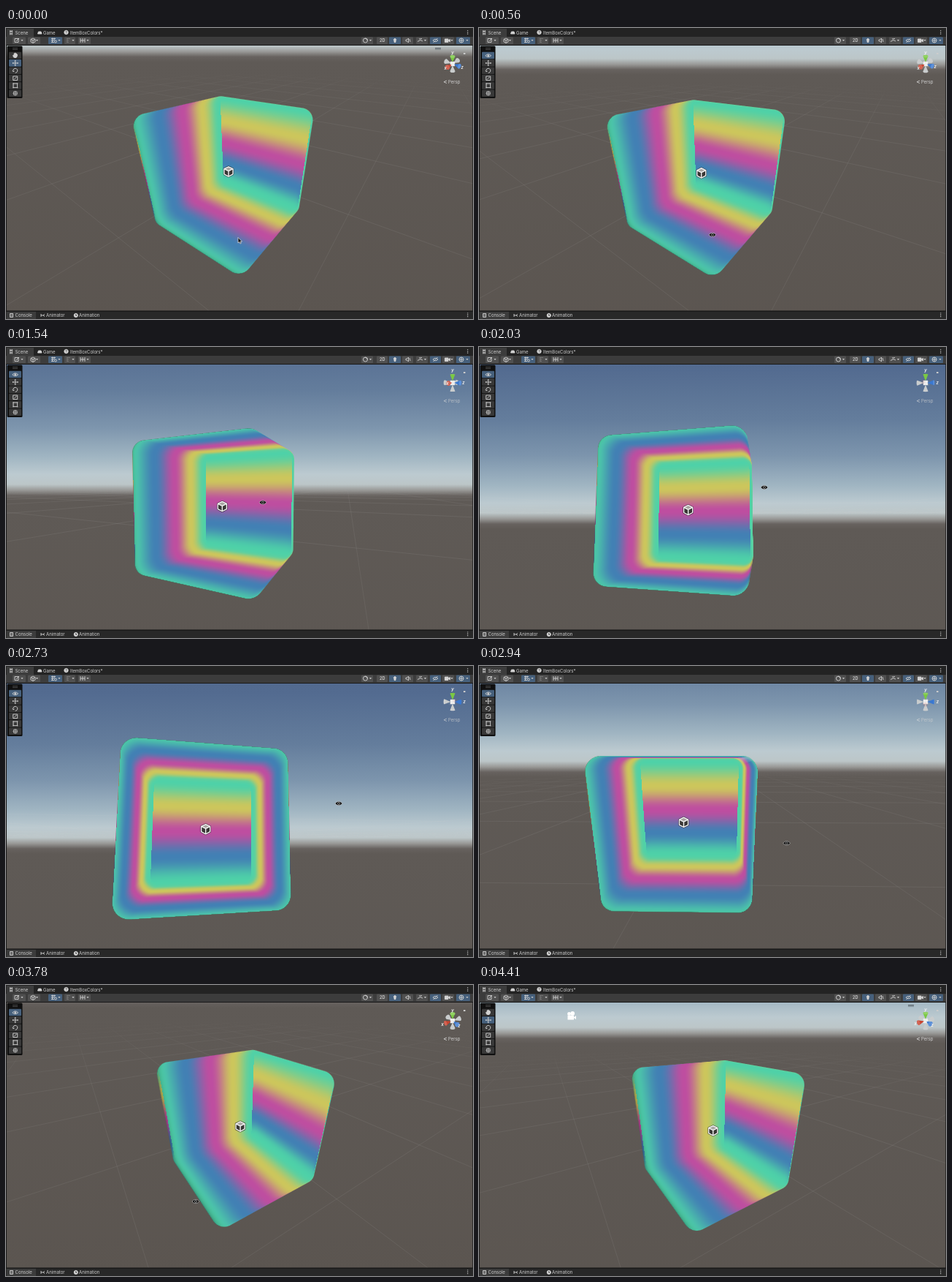
An HTML page with a canvas for the animation above (4.55 s loop, 640x398 px).

```html
<!DOCTYPE html>
<html lang="en">
<head>
<meta charset="utf-8">
<title>Scene orbit</title>
<style>
html, body { margin: 0; width: 640px; height: 398px; overflow: hidden; background: #1f1f1f; }
canvas, svg { position: absolute; left: 0; top: 0; width: 640px; height: 398px; display: block; }
text { font: 6px Inter, Roboto, sans-serif; fill: #d0d0d0; }
.btn { fill: #505050; }
.on { fill: #46607c; }
.ico { fill: none; stroke: #d2d2d2; stroke-width: .9; }
.solid { fill: #d2d2d2; }
</style>
</head>
<body>
<canvas id="view" width="640" height="398"></canvas>
<svg viewBox="0 0 640 398">
  <!-- tabs and toolbar -->
  <path fill="#232323" d="M0 0H640V12H0Z"/>
  <path fill="#3c3c3c" d="M1 1H38V12H640V23.500H0V12H1Z"/>
  <path fill="#191919" d="M0 23H640V24H0Z"/>
  <g class="ico">
    <path d="M5 4.500H9M5 8H9M5.800 3V9.500M8.200 3V9.500"/>
    <path d="M43.500 8L44.500 5H48L49 8Z" class="solid"/>
    <circle cx="82.500" cy="6" r="2.700" class="solid"/>
  </g>
  <text x="81.200" y="8" style="fill:#222;font-size:5px">?</text>
  <text x="12.500" y="8.700">Scene</text>
  <text x="51" y="8.700">Game</text>
  <text x="88" y="8.700">ItemBoxColors*</text>
  <g id="bar"></g>
  <g class="ico">
    <path d="M12 19.500V14.500H17V19.500ZM14 18L18 14"/>
    <path d="M34 15.500L37 14L40 15.500V19L37 20.500L34 19ZM34 15.500L37 17L40 15.500M37 17V20.500"/>
    <path d="M62 14.500H68M62 17H66M62 19.500H66M63.500 13.500V20M66 13.500V17"/>
    <circle cx="68" cy="18.500" r="1.500"/>
    <path d="M83 14.500H88M83 17H86M83 19.500H86M84 14V20" stroke="#777"/>
    <path d="M102 14V20M105 14V20M108 14V20M102 17H108"/>
    <circle cx="492.500" cy="17" r="3"/>
    <path d="M492 14.500A2.500 2.500 0 0 1 495 17"/>
    <path class="solid" d="M532 19.500V18L531.300 15.500A2 2 0 0 1 534.700 15.500L534 18V19.500Z"/>
    <path d="M548 16H549.500L551.500 14V20L549.500 18H548ZM553 15L554 19"/>
    <path d="M564 18.500L568 16.500L571 18M566 15L570 14.500"/>
    <path d="M585 17Q588.500 13.500 592 17Q588.500 20.500 585 17M585.500 20L591.500 14"/>
    <path class="solid" d="M601.500 15H606V19.500H601.500ZM606 17L608.500 15.500V19Z"/>
    <circle cx="624" cy="17" r="3"/>
    <path d="M621 17H627M624 14V20"/>
  </g>
  <text x="512" y="19.200" style="font-size:5.500px;font-weight:600">2D</text>
  <g id="carets" fill="#c8c8c8"></g>
  <!-- floating tools -->
  <rect x="1.500" y="24.500" width="21" height="71.500" rx="1.500" fill="#101010"/>
  <path d="M9 27.500H16M9 29.500H16" stroke="#555" stroke-width=".8"/>
  <g id="tools"></g>
  <g class="ico">
    <g id="hand"><path class="solid" d="M10.500 40L9.500 37.500L11 37.500V35H12V34.300H13V35H14.500V36H15.300V38.500L14 40.500H11.500Z"/></g>
    <g id="eye"><path d="M8.800 37.800Q12.700 33.800 16.600 37.800Q12.700 41.500 8.800 37.800"/><circle cx="12.700" cy="37.800" r="1" class="solid"/></g>
    <path d="M9 48H16.500M12.700 44.300V51.700M10 47L9 48L10 49M15.500 47L16.500 48L15.500 49M11.700 45.300L12.700 44.300L13.700 45.300M11.700 50.700L12.700 51.700L13.700 50.700"/>
    <path d="M10 59.500A3 3 0 1 1 12.700 61.300M9 58.500L10 59.800L11.500 59"/>
    <path d="M9.700 71.500V66H15.700V71.500ZM11 70.500L14.500 67"/>
    <path d="M10 76H15.500V81.500H10ZM9 76H16.500M9 81.500H16.500M10 75V82.500M15.500 75V82.500" stroke-width=".6"/>
    <path d="M9.300 89.300H16M12.700 86V92.700M10.500 87H15V91.500H10.500Z" stroke-width=".7"/>
  </g>
  <path id="grip" d="M588 27.500H596M588 29H596" stroke="#59636a" stroke-width=".9"/>
  <path d="M627 34H629.500V36H627Z" fill="#ccc"/>
  <g id="persp">
    <path d="M604 72L600 73.700L604 75.500" fill="none" stroke="#ddd" stroke-width=".8"/>
    <text x="606" y="75.800">Persp</text>
  </g>
  <!-- lower tabs -->
  <path fill="#191919" d="M0 386.500H640V398H0ZM0 24H1V387H0ZM639.300 24H640V387H639.300Z"/>
  <path fill="#282828" d="M0 388H640V398H0Z"/>
  <path fill="#3c3c3c" d="M1 388H41V398H1Z"/>
  <g class="ico">
    <path d="M5.500 390.500H9.500V395.500H5.500ZM6.500 392H8.500M6.500 394H8.500"/>
    <path d="M48 391V395M48 393H51L53 391.500M51 393L53 394.500"/>
    <circle cx="95.800" cy="393" r="2.600" class="solid"/>
    <path d="M95.800 391.500V393.200H97" stroke="#222"/>
  </g>
  <text x="12.500" y="395.200">Console</text>
  <text x="55" y="395.200">Animator</text>
  <text x="100" y="395.200">Animation</text>
  <path stroke="#ccc" stroke-width="1.100" stroke-dasharray="1.100 1.200" d="M632.700 3V9M632.700 389.500V395.500"/>
  <!-- cursors -->
  <path id="arrow" d="M0 0V7.500L1.800 6L3 8.500L4.300 7.900L3.200 5.500H5.500Z" fill="#111" stroke="#eee" stroke-width=".7"/>
  <g id="look">
    <path d="M-5 0Q0 -5.400 5 0Q0 5.400 -5 0Z" fill="#0a0a0a" stroke="#ddd" stroke-width=".5"/>
    <circle r="1.500" fill="none" stroke="#bbb" stroke-width=".7"/>
  </g>
</svg>
<script>
const LOOP = 4550, STEP = 70, START = 350, END = 4200;
const CX = 320, CY = 205.5, FOCAL = 314, TOP = 24, BOTTOM = 387;
const DIST = 1.72, OFFSET = [-.243, -.091, .167];   // box centre relative to the orbit pivot
const HALF = .52, ROUND = .1;
// pointer drag: time, x, y
const DRAG = [[350, 319, 290], [1050, 327, 245], [2030, 391, 192], [2730, 456, 188],
              [3220, 345, 326], [3780, 260, 296], [4130, 261, 276]];
const BANDS = [[78, 209, 168], [66, 128, 180], [190, 78, 160], [204, 198, 92]];
// sky: pixels below the horizon, colour
const SKY = [[-260, '#4f668b'], [-200, '#536b90'], [-130, '#647d9c'], [-80, '#7d95ad'], [-40, '#a0b5c2'],
             [-16, '#bccad0'], [-2, '#bcc6c8'], [6, '#989896'], [13, '#67625f'], [20, '#5f5a56'], [400, '#5b5550']];

const $ = id => document.getElementById(id);
const ctx = $('view').getContext('2d', { willReadFrequently: true });
const dot = (a, b) => a[0] * b[0] + a[1] * b[1] + a[2] * b[2];
const clamp = (v, lo, hi) => Math.min(hi, Math.max(lo, v));
const rad = deg => deg * Math.PI / 180;

const slope = (i, c) => (DRAG[i + 1][c] - DRAG[i][c]) / (DRAG[i + 1][0] - DRAG[i][0]);
function tangent(i, c) {
  if (i === 0 || i === DRAG.length - 1) return 0;
  const a = slope(i - 1, c), b = slope(i, c);
  return a * b > 0 ? 2 * a * b / (a + b) : 0;
}
function pointer(t, c) {
  t = clamp(t, DRAG[0][0], DRAG[DRAG.length - 1][0]);
  let i = 0;
  while (i < DRAG.length - 2 && t > DRAG[i + 1][0]) i++;
  const w = DRAG[i + 1][0] - DRAG[i][0], s = (t - DRAG[i][0]) / w, r = 1 - s;
  return DRAG[i][c] * (1 + 2 * s) * r * r + DRAG[i + 1][c] * s * s * (3 - 2 * s)
       + w * s * r * (tangent(i, c) * r - tangent(i + 1, c) * s);
}

function camera(x, y) {
  const yaw = rad(-36.5 + .345 * (x - 319)), pitch = rad(29.7 + .347 * (y - 290));
  const s = Math.sin(yaw), c = Math.cos(yaw), sp = Math.sin(pitch), cp = Math.cos(pitch);
  const right = [c, 0, -s], up = [s * sp, cp, c * sp], fwd = [s * cp, -sp, c * cp];
  const eye = OFFSET.map((o, i) => -o - DIST * fwd[i]);
  return { right, up, fwd, eye, horizon: CY - FOCAL * Math.tan(pitch) };
}
function toScreen(cam, v) {
  const z = dot(v, cam.fwd);
  return [CX + FOCAL * dot(v, cam.right) / z, CY - FOCAL * dot(v, cam.up) / z, z];
}
const project = (cam, p) => toScreen(cam, p.map((v, i) => v - cam.eye[i]));

const last = camera(261, 276);
const REEL_DIR = [0, 1, 2].map(i => -194 * last.right[i] + 163.5 * last.up[i] + FOCAL * last.fwd[i]);

function drawSky(h) {
  const g = ctx.createLinearGradient(0, h - 260, 0, h + 400);
  for (const [y, col] of SKY) g.addColorStop((y + 260) / 660, col);
  ctx.fillStyle = g;
  ctx.fillRect(0, TOP, 640, BOTTOM - TOP);
}

function drawGrid(cam) {
  const N = 9;
  ctx.lineWidth = .8;
  const piece = (a, b) => {
    const p = project(cam, a), q = project(cam, b);
    if (p[2] < .1 || q[2] < .1) return;
    const fade = 1 - Math.hypot(a[0], a[2]) / N;
    if (fade <= 0) return;
    ctx.strokeStyle = `rgba(205,205,205,${.13 * fade})`;
    ctx.beginPath();
    ctx.moveTo(p[0], p[1]);
    ctx.lineTo(q[0], q[1]);
    ctx.stroke();
  };
  for (let k = -N; k <= N; k++)
    for (let j = -N; j < N; j += .5) {
      piece([k, 0, j], [k, 0, j + .5]);
      piece([j, 0, k], [j + .5, 0, k]);
    }
}

// Far side of a rounded box: walk each ray back from where it leaves the box.
function drawBox(cam) {
  const pts = [];
  for (let i = 0; i < 8; i++)
    pts.push(project(cam, [i & 1 ? HALF : -HALF, i & 2 ? HALF : -HALF, i & 4 ? HALF : -HALF]));
  const xs = pts.map(p => p[0]), ys = pts.map(p => p[1]);
  const x0 = Math.max(0, Math.floor(Math.min(...xs))), x1 = Math.min(640, Math.ceil(Math.max(...xs)));
  const y0 = Math.max(TOP, Math.floor(Math.min(...ys))), y1 = Math.min(BOTTOM, Math.ceil(Math.max(...ys)));
  const img = ctx.getImageData(x0, y0, x1 - x0, y1 - y0), px = img.data;
  const { right: R, up: U, fwd: F, eye: E } = cam, core = HALF - ROUND;
  const d = [0, 0, 0];
  let k = -4;
  for (let y = y0; y < y1; y++) for (let x = x0; x < x1; x++) {
    k += 4;
    const a = x + .5 - CX, b = CY - y - .5, len = Math.hypot(a, b, FOCAL);
    let near = 0, far = 1e9;
    for (let i = 0; i < 3; i++) {
      d[i] = (F[i] * FOCAL + R[i] * a + U[i] * b) / len;
      const mid = -E[i] / d[i], ext = Math.abs(HALF / d[i]);
      near = Math.max(near, mid - ext);
      far = Math.min(far, mid + ext);
    }
    if (near >= far) continue;
    let t = far, best = 1, qx, qy, qz, py, pz;
    for (let n = 0; n < 30 && t > near - .01; n++) {
      py = E[1] + d[1] * t;
      pz = E[2] + d[2] * t;
      qx = Math.abs(E[0] + d[0] * t) - core;
      qy = Math.abs(py) - core;
      qz = Math.abs(pz) - core;
      const gap = Math.hypot(Math.max(qx, 0), Math.max(qy, 0), Math.max(qz, 0)) - ROUND;
      best = Math.min(best, gap);
      if (gap < .0008) break;
      t -= gap;
    }
    const cover = best < .0008 ? 1 : clamp(1 - best * FOCAL / far, 0, 1);
    if (!cover) continue;
    const u = clamp((qz >= Math.max(qx, qy) ? py : pz) + .5, 0, .9999) * 4, i = Math.floor(u);
    const s = u - i, e = s * s * (3 - 2 * s);
    // the front rim turns darker as it curves over
    const rim = pz < 0 ? clamp(qz / ROUND, 0, 1) : 0, shade = 1 - .3 * rim * rim;
    const A = BANDS[i], B = BANDS[(i + 1) % 4];
    for (let c = 0; c < 3; c++)
      px[k + c] += ((A[c] + (B[c] - A[c]) * e) * shade - px[k + c]) * cover;
  }
  ctx.putImageData(img, x0, y0);
}

function poly(points, fill, stroke, width = 1) {
  ctx.beginPath();
  points.forEach(([x, y]) => ctx.lineTo(x, y));
  ctx.closePath();
  if (fill) { ctx.fillStyle = fill; ctx.fill(); }
  if (stroke) { ctx.strokeStyle = stroke; ctx.lineWidth = width; ctx.stroke(); }
}

function drawIcon(cam) {
  const [x, y] = project(cam, [0, 0, 0]);
  ctx.save();
  ctx.translate(x, y);
  ctx.lineJoin = 'round';
  const hex = [[0, -6.5], [6, -3.6], [6, 3.6], [0, 6.8], [-6, 3.6], [-6, -3.6]];
  poly(hex, '#3a3836', 'rgba(25,25,25,.7)', 2.6);
  poly([[0, -6.5], [6, -3.6], [0, -.6], [-6, -3.6]], '#a9a5a2');
  poly(hex, null, '#f4f4f4', 1.4);
  ctx.beginPath();
  ctx.moveTo(-6, -3.6); ctx.lineTo(0, -.6); ctx.lineTo(6, -3.6);
  ctx.moveTo(0, -.6); ctx.lineTo(0, 6.8);
  ctx.stroke();
  ctx.restore();
}

function disc(x, y, r) {
  ctx.beginPath();
  ctx.arc(x, y, r, 0, 7);
  ctx.fill();
}

function drawReel(cam) {
  const [x, y, z] = toScreen(cam, REEL_DIR);
  if (z <= 0) return;
  ctx.fillStyle = '#fff';
  disc(x - 2.5, y - 2.6, 2.4);
  disc(x + 2.2, y - 3.2, 2.9);
  ctx.fillRect(x - 4.5, y - .5, 8.5, 6);
  poly([[x + 3.5, y + 2.5], [x + 7, y], [x + 7, y + 5]], '#fff');
}

function drawGizmo(cam) {
  const gx = 612, gy = 49, reach = 11.5, wide = 3.5;
  const axes = [['x', [0, 0, -1], '#c9432f'], ['y', [0, 1, 0], '#7ac943'], ['z', [1, 0, 0], '#3a78d0']];
  const arms = [{ v: [0, 0, 0], hub: true }];
  for (const [name, v, col] of axes) {
    arms.push({ v, col, name });
    arms.push({ v: v.map(n => -n), col: '#c9cccd' });
  }
  arms.sort((a, b) => dot(b.v, cam.fwd) - dot(a.v, cam.fwd));
  ctx.font = 'italic 600 6px Inter, Roboto, sans-serif';
  ctx.textAlign = 'center';
  ctx.textBaseline = 'middle';
  for (const { v, col, name, hub } of arms) {
    if (hub) {
      ctx.fillStyle = '#eee';
      ctx.fillRect(gx - 3.2, gy - 3.2, 6.4, 6.4);
      continue;
    }
    const dx = dot(v, cam.right), dy = -dot(v, cam.up), z = dot(v, cam.fwd), len = Math.hypot(dx, dy);
    ctx.globalAlpha = clamp((.985 - Math.abs(z)) * 12, 0, 1);
    ctx.save();
    ctx.translate(gx, gy);
    ctx.rotate(Math.atan2(dy, dx));
    ctx.fillStyle = col;
    ctx.beginPath();
    ctx.moveTo(2.5 * len, 0);
    ctx.lineTo(reach * len, -wide);
    ctx.ellipse(reach * len, 0, Math.abs(z) * wide + .4, wide, 0, -Math.PI / 2, Math.PI / 2);
    ctx.fill();
    if (z < 0) {
      ctx.fillStyle = 'rgba(255,255,255,.18)';
      ctx.beginPath();
      ctx.ellipse(reach * len, 0, Math.abs(z) * wide + .2, wide, 0, 0, 7);
      ctx.fill();
    }
    ctx.restore();
    if (name) {
      ctx.fillStyle = '#f2f2f2';
      ctx.fillText(name, gx + dx * 16.5, gy + dy * 16.5);
    }
  }
  ctx.globalAlpha = 1;
}

function buildUi() {
  const rect = (x, y, w, h, cls) => `<rect class="${cls}" x="${x}" y="${y}" width="${w}" height="${h}" rx="1"/>`;
  const bar = [[9, 18], [30, 17], [58, 19, 1], [80, 15], [99, 17], [487, 16], [508, 15], [525, 16, 1],
               [543, 15], [562, 16], [581, 15, 1], [598, 16], [617, 19, 1]];
  $('bar').innerHTML = bar.map(([x, w, on]) => rect(x, 12.5, w, 9.5, on ? 'on' : 'btn')).join('');
  $('carets').innerHTML = [22, 42.5, 73, 92, 112, 499.5, 574.5, 611, 632]
    .map(x => `<path d="M${x - 1.6} 16H${x + 1.6}L${x} 18Z"/>`).join('');
  $('tools').innerHTML = [0, 1, 2, 3, 4, 5].map(i => rect(4, 32.7 + i * 10.35, 17, 9.6, 'btn')).join('');
}

function show(id, on) { $(id).style.display = on ? '' : 'none'; }

function render(t) {
  const x = pointer(t, 1), y = pointer(t, 2), cam = camera(x, y);
  drawSky(cam.horizon);
  drawGrid(cam);
  drawBox(cam);
  drawReel(cam);
  drawIcon(cam);
  drawGizmo(cam);

  const orbiting = t >= START && t < END;
  show('look', orbiting);
  show('eye', orbiting);
  show('hand', !orbiting);
  show('grip', !orbiting);
  show('arrow', t < START || t === END);
  [...$('tools').children].forEach((el, i) =>
    el.style.fill = i === (orbiting ? 0 : 1) ? '#46607c' : '#383838');
  $('persp').style.opacity = cam.horizon > 90 ? .75 : 1;
  $('look').setAttribute('transform', `translate(${x} ${y})`);
  const nudge = t < START ? Math.min(2, t / STEP) : 0;
  $('arrow').setAttribute('transform', `translate(${x - 1 + nudge} ${y - 3.5 + nudge})`);
}

buildUi();
const begin = performance.now();
let shown = -1;
function tick() {
  const t = Math.floor(((performance.now() - begin) % LOOP) / STEP) * STEP;
  if (t !== shown) render(shown = t);
  requestAnimationFrame(tick);
}
tick();
</script>
</body>
</html>
```
